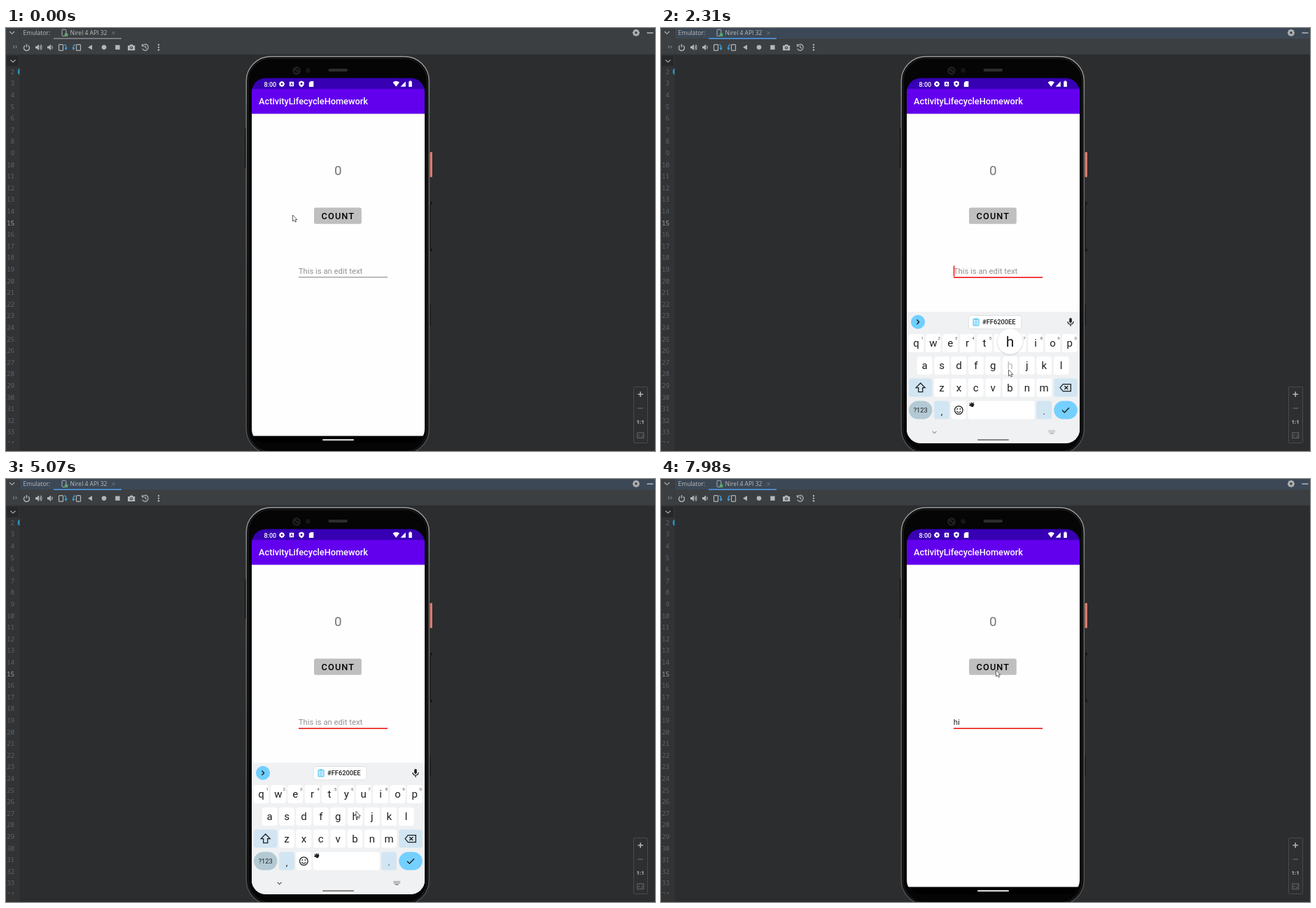
Animation of 927 by 604 pixels, one loop 8000 ms. Source, as an HTML page:

```html
<!DOCTYPE html>
<html lang="en">
<head>
<meta charset="utf-8">
<title>Emulator</title>
<style>
  html, body { margin: 0; width: 100%; height: 100%; overflow: hidden; background: #2b2d2f; }
  svg { display: block; width: 927px; height: 604px; font-family: Roboto, sans-serif; }
  .ide { font-family: "Open Sans", "Noto Sans", sans-serif; }
  .mono { font-family: "Noto Sans Mono", monospace; }
</style>
</head>
<body>
<svg id="stage" viewBox="0 0 927 604" xmlns="http://www.w3.org/2000/svg"></svg>
<script>
const LOOP = 8000;
const stage = document.getElementById('stage');

// SVG string helpers
const rect = (x, y, w, h, fill, r = 0, more = '') =>
  `<rect x="${x}" y="${y}" width="${w}" height="${h}" rx="${r}" fill="${fill}" ${more}/>`;
const circle = (x, y, r, fill, more = '') => `<circle cx="${x}" cy="${y}" r="${r}" fill="${fill}" ${more}/>`;
const line = (d, color, w = 1, more = '') => `<path d="${d}" fill="none" stroke="${color}" stroke-width="${w}" ${more}/>`;
const shape = (d, fill, more = '') => `<path d="${d}" fill="${fill}" ${more}/>`;
const text = (x, y, size, fill, str, more = '') =>
  `<text x="${x}" y="${y}" font-size="${size}" fill="${fill}" ${more}>${str}</text>`;
const group = (x, y, content, more = '') => `<g transform="translate(${x} ${y})" ${more}>${content}</g>`;
const MID = 'text-anchor="middle"';

function gear(x, y, r, color, hole) {
  const teeth = Array.from({ length: 4 }, (_, i) =>
    rect(-r * .27, -r, r * .54, r * 2, color, .4, `transform="rotate(${i * 45})"`)).join('');
  return group(x, y, teeth + circle(0, 0, r * .72, color) + circle(0, 0, r * .34, hole));
}

function toolbar() {
  const c = '#b4b7b9', blue = '#3f9bd8';
  const speaker = x => shape(`M${x} 26H${x + 2}L${x + 5} 23.2V32L${x + 2} 29.3H${x}Z`, c);
  const rotate = (x, dir) => group(x, 27.6,
    rect(-5.5, -4, 6, 8.6, 'none', 1, `stroke="${c}" stroke-width="1.2"`) +
    line('M2 -4Q5.5 -3 4.8 2M3 .5L4.6 3L6 .6', blue, 1.4), `transform-origin="0 0"`)
    .replace('translate(' + x + ' 27.6)', `translate(${x} 27.6) scale(${dir} 1)`);
  return line('M10 25L12 27L10 29M13.5 25L15.5 27L13.5 29', '#9a9da0', .9) +
    line('M27.3 25A4 4 0 1 0 31.7 25M29.5 23V27.6', c, 1.4) +
    speaker(42) + line('M48.3 25.4Q50 27.6 48.3 29.8M49.6 23.7Q52.6 27.6 49.6 31.5', c, 1.1) +
    speaker(59) + line('M65.3 25.4Q67 27.6 65.3 29.8', c, 1.1) +
    rotate(81, 1) + rotate(101, -1) +
    shape('M117 27.6L123 24V31.2Z', c) + circle(140, 27.6, 3.3, c) + rect(156.2, 24.4, 6.4, 6.4, c) +
    shape('M174 25H176.5L177.5 23.6H180.8L181.8 25H184.2V32H174Z', c) + circle(179.1, 28.3, 2.1, '#3c3f41') +
    circle(179.1, 28.3, 1, c) +
    line('M195.2 25A4.4 4.4 0 1 1 194.8 29.6M194.5 23V26H197.6M199 25V28L201 29', c, 1.2) +
    [24, 27.6, 31.2].map(y => circle(218, y, 1.2, c)).join('');
}

function ide() {
  let s = rect(0, 0, 927, 604, '#2b2d2f') + rect(0, 38, 19.5, 566, '#313335') +
    rect(0, 0, 927, 38, '#3c3f41') + rect(19.5, 0, 908, 15, '#3c3f41', 0, 'id="header"') +
    rect(0, 37.5, 927, .8, '#323232') + rect(19, 0, .7, 38, '#35383a');
  s += line('M5 5L8.5 8.3L12 5', '#b4b7b9', 1.1);
  s += `<g class="ide">` + text(24.5, 10.2, 8.5, '#bbbbbb', 'Emulator:') +
    text(91.5, 10.2, 8.5, '#bbbbbb', 'Nirel 4 API 32') + '</g>';
  s += rect(80, 2.2, 5.8, 9.2, 'none', 1, 'stroke="#aeb1b3"') + rect(83.8, 7.5, 4.5, 4.5, '#59a869', .6);
  s += line('M151.3 5L155.7 9.4M155.7 5L151.3 9.4', '#7d8082', .8);
  s += rect(68, 14, 97, 2, '#747a80', 0, 'id="tabLine"');
  s += gear(900, 6.8, 5, '#afb1b3', '#3c3f41') + rect(915.5, 6.2, 9, 1.6, '#afb1b3');
  s += toolbar();
  s += rect(1, 39.5, 17, 15, '#26282a') + line('M6.5 45.5L10 48.8L13.5 45.5', '#b4b7b9', 1.1);
  s += shape('M19.5 57.5Q16.5 59 16.8 62.3Q16.5 65.8 19.5 67Z', '#2b93bb');
  s += '<g class="mono">';
  for (let n = 2; n <= 34; n++) {
    s += text(12.3, (65.8 + (n - 2) * 16.6).toFixed(1), 9.5, n === 15 ? '#a4a3a3' : '#606366', n, 'text-anchor="end"');
  }
  s += '</g>' + rect(0, 592.5, 19.5, 12, '#313335');
  s += rect(896.5, 512.5, 20, 80, '#2d2f31', 1, 'stroke="#484b4d"') +
    line('M902.5 523H910M906.2 519.2V526.8', '#b4b7b9', 1.5) + line('M902.5 543H910', '#5d6062', 1.4) +
    text(906.2, 565.3, 8, '#c0c3c5', '1:1', `${MID} font-weight="700"`) +
    rect(901.8, 578, 9, 7.6, 'none', 0, 'stroke="#696c6e"') +
    line('M903.8 583.6V581.6H906M907 583.6H909V580.4', '#696c6e', .8);
  return s;
}

function phone() {
  let s = rect(341, 143, 2, 57, '#101112', 1) + rect(605.6, 177, 3.2, 36, '#e5806f', 1.3);
  for (const y of [248, 315]) s += rect(606.5, y, 2, 4, '#111');
  s += rect(605.5, 252, 1.2, 64, '#1a1b1c') + rect(605.5, 395, 1.2, 30, '#1a1b1c');
  s += `<linearGradient id="rim" x2="0" y2="1"><stop offset="0" stop-color="#9a9a9a"/>
    <stop offset=".16" stop-color="#6e6f70"/><stop offset="1" stop-color="#4b4c4d"/></linearGradient>`;
  s += rect(343.3, 40.8, 261, 567, '#050505', 35, 'stroke="url(#rim)" stroke-width="1.6"');
  s += rect(346, 43.5, 255.6, 561.5, 'none', 32, 'stroke="#1c1c1d" stroke-width="1.4"');
  s += circle(415, 61, 6, '#1d1d1f') + circle(415, 61, 3.2, '#0b0b0c') +
    line('M412.5 58.5L417.5 63', '#45474a', 1) + circle(431.5, 60.5, 3.4, '#151517') +
    rect(460.5, 58, 27.5, 4.2, '#2c2c2d', 2);
  return s;
}

function statusBar() {
  const w = '#ffffff';
  return rect(351, 71, 248, 17, '#3700b3') + rect(351, 87, 248, 35.5, '#6200ee') +
    text(368.5, 83.5, 9, w, '8:00', 'font-weight="500"') + gear(394, 80, 4, w, '#3700b3') +
    rect(404.8, 76.8, 6.4, 6.4, w, .6) + text(408, 82, 5.5, '#3700b3', 'A', `${MID} font-weight="700"`) +
    shape('M422 75.6L425.7 77V80Q425.5 83 422 84.4Q418.5 83 418.3 80V77Z', w) + circle(422, 79.6, 1.5, '#3700b3') +
    shape('M432.8 78L435 76H439.3V84H432.8Z', w) +
    shape('M552.5 77.6Q557.2 73.8 562 77.6L557.2 83.7Z', w) + shape('M563.5 83.7L570.8 76.3V83.7Z', w) +
    rect(575.2, 76.2, 4.6, 7.8, w, .6) + rect(576.4, 75.3, 2.2, 1.2, w) +
    text(361, 109.3, 12.75, w, 'ActivityLifecycleHomework', 'font-weight="500"');
}

function app() {
  return rect(351, 71, 248, 523, '#000') + rect(351, 122, 248, 460.5, '#fefefe') + statusBar() +
    text(474.2, 210, 18.8, '#757575', '0', MID) +
    rect(440, 256.5, 67.8, 23.3, '#bfbfbf', 2.5) +
    text(450.6, 273, 12.7, '#000', 'COUNT', 'font-weight="500" letter-spacing="1.15"') +
    text(417.7, 351.4, 11.3, '#8c8c8c', 'This is an edit text', 'id="hint"') +
    text(417.7, 351.4, 11.3, '#202020', '', 'id="typed"') +
    rect(418, 355.4, 127, 1, '#7a7a7a', 0, 'id="underline"') +
    rect(418, 339.5, 1.4, 15.3, '#ff0000', 0, 'id="caret"');
}

const KEY_STEP = 24.37;
const ROWS = [['qwertyuiop', 364.5, 450], ['asdfghjkl', 376.7, 482], ['zxcvbnm', 401, 513.6]];
const keyAt = {};

function keyboard() {
  const ink = '#1e1f20', tint = '#d2e5f2';
  const key = (x, y, w, fill = '#fff', r = 3.5, more = '') => rect(x - w / 2, y - 13, w, 26, fill, r, more);
  let s = rect(351, 405.3, 248, 240, '#f0f1f3');
  s += circle(367, 419.8, 10, '#6fcfff') + line('M365.4 416.6L368.6 419.8L365.4 423', ink, 1.4);
  s += '<g id="chip">' + rect(439.3, 410.5, 75.6, 19.2, '#fff', 4, 'stroke="#d9dbdd" stroke-width=".8"') +
    rect(446, 415.6, 8, 9.2, '#c9efff', .8, 'stroke="#5fc8f2" stroke-width="1.2"') + rect(448, 414.4, 4, 2.2, '#5fc8f2') +
    line('M448 419H452M448 421H452M448 423H451', '#5fc8f2', .8) +
    text(459, 423.3, 9.3, ink, '#FF6200EE', 'font-weight="500"') + '</g>';
  s += rect(583.2, 414, 3.6, 7, ink, 1.8) + line('M581 419Q581 423 585 423Q589 423 589 419M585 423V426', ink, 1.2);

  for (const [letters, x0, y] of ROWS) {
    [...letters].forEach((ch, i) => {
      const x = +(x0 + i * KEY_STEP).toFixed(1);
      keyAt[ch] = [x, y];
      s += key(x, y, 21.8) + text(x, y + 5, 15, ink, ch, `${MID} id="key-${ch}"`);
      if (y === 450) s += text(x + 8.4, 444.6, 6.2, '#555', (i + 1) % 10, `${MID} id="sup-${ch}"`);
    });
  }
  s += key(370.7, 513.6, 33.5, tint) + line('M370.7 507L364.3 513.6H367.7V519.6H373.7V513.6H377.1Z', ink, 1.3);
  s += key(578, 513.6, 33.5, tint, 3.5, 'id="del"') +
    line('M570 513.6L574.3 508.6H585.3V518.6H574.3ZM576.3 511.2L581.3 516M581.3 511.2L576.3 516', ink, 1.3);

  const y = 545.6;
  s += key(370.7, y, 33.5, '#b3c9d4', 13) + text(370.7, y + 3.5, 9.2, ink, '?123', MID);
  s += key(401, y, 21.8, tint) + text(401, y + 6, 13, ink, ',', MID);
  s += key(425.3, y, 21.8) + circle(425.3, y, 5.8, 'none', `stroke="${ink}" stroke-width="1.3"`) +
    circle(423.2, y - 1.6, .9, ink) + circle(427.4, y - 1.6, .9, ink) + line('M422.2 547Q425.3 551 428.4 547', ink, 1.2);
  s += key(486.1, y, 95) + group(444, 537.6,
    shape('M-3 0L1 -2L3.6 .2L1.6 3.6L-1 3.2Z', ink) + line('M-3.4 -2L-1 .4M-1 -3.2L.4 0M2 -3.2L2 0M-4 1L0 2', ink, 1.2));
  s += key(547, y, 21.8, tint) + text(547, y + 6, 13, ink, '.', MID);
  s += key(578, y, 33.5, '#74d0ff', 13, 'id="enter"') + line('M573 545.8L576.3 549L583 542.3', ink, 1.4);

  s += '<g id="navIcons">' + line('M387.7 575.8L390.6 578.7L393.5 575.8', '#555', 1.2);
  for (let i = 0; i < 10; i++) s += rect(553.6 + (i % 5) * 2, 574.2 + (i / 5 | 0) * 2, 1.2, 1.2, '#666');
  s += rect(555.5, 578.4, 5.4, 1.2, '#666') + '</g>';
  s += '<g id="popup">' + circle(0, .9, 19, '#000', 'opacity=".1"') + circle(0, 0, 18.5, '#fff', 'stroke="#dfe1e3" stroke-width=".6"') +
    text(0, 7.5, 21, ink, '', `${MID} id="popupChar"`) +
    '<g id="popupDots">' + [-2.2, 0, 2.2].map(x => circle(x, 15, .7, ink)).join('') + '</g></g>';
  return s;
}

stage.innerHTML = `<clipPath id="screen"><rect x="351" y="71.5" width="247" height="521.5" rx="20"/></clipPath>` +
  ide() + phone() + `<g clip-path="url(#screen)">${app()}<g id="keyboard">${keyboard()}</g>` +
  rect(452, 587.2, 45, 1.8, '#fff', .9, 'id="home"') + '</g>' +
  shape('M0 0V9L2.1 7.2L3.5 10.2L5 9.5L3.7 6.6H6.4Z', '#fff', 'id="pointer" stroke="#3a3a3a" stroke-width=".8"');

const el = Object.fromEntries([...stage.querySelectorAll('[id]')].map(e => [e.id, e]));
const set = (id, attr, value) => el[id].setAttribute(attr, value);
const show = (id, on) => set(id, 'visibility', on ? 'inherit' : 'hidden');

const run = (from, count, step = 120) => Array.from({ length: count }, (_, i) => from + i * step);
const TICKS = [...run(0, 5, 150), ...run(910, 3), ...run(1300, 7), ...run(2310, 6), 3150, 3300, 3420,
  ...run(3570, 3), 3950, 4200, 4350, 4630, 4800, 4950, 5070, 5320, ...run(5470, 5), 6080, 6360, 6480,
  ...run(6620, 4), ...run(7260, 7)];

const POINTER = [[0, 409.5, 267], [150, 416, 266.5], [300, 462.5, 328], [450, 473.5, 350.5], [600, 476.5, 356.5],
  [1150, 476.5, 356.5], [2020, 496.5, 488], [2430, 496.5, 488], [2910, 533.5, 451.5], [3150, 533.5, 451.5],
  [3420, 544.5, 477], [3810, 580, 520.5], [4350, 580, 520.5], [4630, 530.5, 482], [4800, 514.5, 474.5],
  [5070, 500, 474.5], [5470, 500, 474.5], [6080, 528, 452], [6360, 528, 452], [6480, 558, 503],
  [6860, 572, 549], [7260, 572, 549], [7980, 478.5, 273]];
const KEYBOARD = [[910, 0], [1030, .08], [1150, .65], [1300, 1], [7140, 1], [7260, .62], [7380, .15], [7500, 0]];
const TYPED = [[0, ''], [2430, 'u'], [3150, 'ui'], [4200, 'u'], [4350, ''], [5470, 'h'], [6360, 'hi']];
const CARET_RESETS = [1010, 2430, 3150, 4200, 4350, 5470, 6360, 7200];
const PRESSES = [['h', 2310, 2430], ['i', 2910, 3150], ['h', 5320, 5470], ['i', 6080, 6360]];

const latest = (list, t) => list.filter(k => (k[0] ?? k) <= t).pop();

function track(keys, t) {
  const i = keys.findIndex(k => k[0] > t);
  if (i < 0) return keys[keys.length - 1].slice(1);
  if (i === 0) return keys[0].slice(1);
  const [a, b] = [keys[i - 1], keys[i]];
  const u = (t - a[0]) / (b[0] - a[0]);
  return a.slice(1).map((v, j) => v + (b[j + 1] - v) * u);
}

let pressed = null;
function paintKey(ch, on) {
  set('key-' + ch, 'fill', on ? '#b9bbbd' : '#1e1f20');
  if (el['sup-' + ch]) set('sup-' + ch, 'fill', on ? '#b9bbbd' : '#555');
}

function render(time) {
  const t = latest(TICKS, time);
  const focused = t >= 910;
  set('header', 'fill', focused ? '#3c4856' : '#3c3f41');
  set('tabLine', 'fill', focused ? '#4a88c7' : '#747a80');
  set('underline', 'fill', focused ? '#f01414' : '#7a7a7a');
  set('underline', 'height', focused ? 1.6 : 1);

  const typed = latest(TYPED, t)[1];
  el.typed.textContent = typed;
  show('hint', !typed);
  set('hint', 'fill', t >= 910 && t < 1030 ? '#6e6e6e' : '#919191');

  const reset = latest(CARET_RESETS, t);
  show('caret', reset !== undefined && (t - reset) % 1000 < 500);
  set('caret', 'x', 417.8 + (typed ? el.typed.getComputedTextLength() : 0));

  const [open] = track(KEYBOARD, t);
  show('keyboard', open > 0);
  set('keyboard', 'opacity', open);
  set('keyboard', 'transform', `translate(0 ${50 * (1 - open)})`);
  set('home', 'fill', open > 0 ? '#777' : '#fff');
  show('chip', t < 7260);
  set('navIcons', 'opacity', track([[2310, .6], [3150, 1]], t)[0]);
  set('del', 'fill', t >= 3950 && t < 4350 ? '#b3c9d4' : '#d2e5f2');
  set('enter', 'fill', t >= 6980 && t < 7260 ? '#62b4de' : '#74d0ff');

  const press = PRESSES.find(([, from, to]) => t >= from && t < to);
  if (pressed) paintKey(pressed, false);
  pressed = press ? press[0] : null;
  show('popup', pressed);
  show('popupDots', pressed === 'i');
  if (pressed) {
    const [x, y] = keyAt[pressed];
    paintKey(pressed, true);
    el.popupChar.textContent = pressed;
    set('popup', 'transform', `translate(${x} ${y - 34.5})`);
  }
  set('pointer', 'transform', `translate(${track(POINTER, t)})`);
}

const start = performance.now();
function frame(now) {
  render(Math.max(0, now - start) % LOOP);
  requestAnimationFrame(frame);
}
render(0);
requestAnimationFrame(frame);
</script>
</body>
</html>
```
